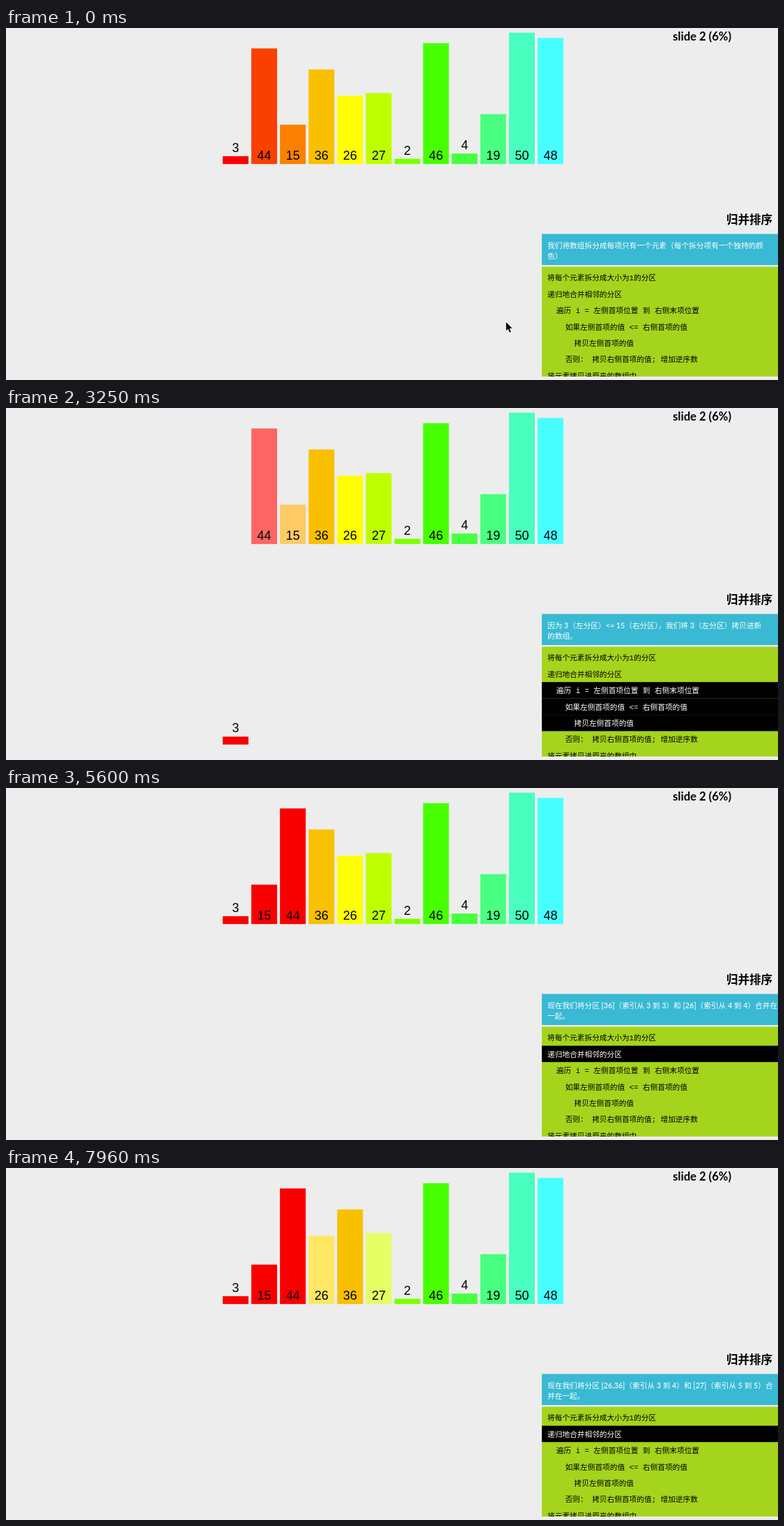
Recreate the animation shown at these times as an HTML page with a canvas. Size 1108 by 505 pixels, loop 8000 ms.

```html
<!DOCTYPE html>
<html lang="zh-CN">
<head>
<meta charset="utf-8">
<title>归并排序</title>
<style>
html, body { margin: 0; width: 100%; height: 100%; overflow: hidden; background: #ededed; }
canvas { display: block; }
</style>
</head>
<body>
<canvas id="stage" width="1108" height="505"></canvas>
<script>
const ctx = document.getElementById('stage').getContext('2d');

const LOOP = 8000, TICK = 147.4;
const FIRST = 179, PERIOD = 451.6, MOVE = 250;
const CJK = '"Noto Sans CJK SC", "Noto Sans CJK", sans-serif';
const NOTE_FONT = '500 10.7px Lato, ' + CJK;
const CODE_FONT = '500 10.7px "Liberation Mono", "Noto Sans CJK SC", "Noto Sans CJK", monospace';

const values = [3, 44, 15, 36, 26, 27, 2, 46, 4, 19, 50, 48];
const code = [
  [0, '将每个元素拆分成大小为1的分区'],
  [0, '递归地合并相邻的分区'],
  [1, '遍历 i = 左侧首项位置 到 右侧末项位置'],
  [2, '如果左侧首项的值 <= 右侧首项的值'],
  [3, '拷贝左侧首项的值'],
  [2, '否则： 拷贝右侧首项的值; 增加逆序数'],
  [0, '将元素拷贝进原来的数组中']
];

// Run the sort once and keep a snapshot of the bars after every step.
const bars = {};
values.forEach((v, i) => { bars[v] = { slot: i, low: 0, tint: i, lit: false }; });
const steps = [];
let inversions = 0;

function snap(text, rows) {
  steps.push({ text, rows, bars: values.map(v => ({ ...bars[v] })) });
}

function light(...heads) {
  heads.forEach(v => { if (v !== undefined) bars[v].lit = true; });
}

// "|" marks a line break in the note.
function announce(left, right, start, tail) {
  const mid = start + left.length, end = mid + right.length - 1;
  light(left[0], right[0]);
  snap(`现在我们将分区 [${left}]（索引从 ${start} 到 ${mid - 1}）和 [${right}]（索引从 ${mid} 到 ${end}）${tail}`, [1]);
}

function merge(left, right, start, tail) {
  announce(left, right, start, tail);
  const out = [];
  while (left.length || right.length) {
    const [a, b] = [left[0], right[0]];
    const fromLeft = b === undefined || a <= b;
    const v = fromLeft ? left.shift() : right.shift();
    const both = a !== undefined && b !== undefined;
    const side = fromLeft ? '左' : '右';
    const why = both ? `${a}（左分区）${fromLeft ? '<=' : '>'} ${b}（右分区）`
                     : `${fromLeft ? '右' : '左'}分区是空的`;
    let text = `因为${both ? ' ' : ''}${why}，我们将 ${v}（${side}分区）拷贝进新${both ? '|' : ''}的数组。`;
    if (!fromLeft) {
      text += `${both ? '' : '|'}(我们将左分区的大小 (= ${left.length}) 加至逆序数 (${inversions}).)`;
      inversions += left.length;
    }
    bars[v] = { slot: start + out.length, low: 1, tint: start, lit: false };
    out.push(v);
    light(left[0], right[0]);
    snap(text, fromLeft ? [2, 3, 4] : [2, 5]);
  }
  for (const v of out) {
    bars[v].low = 0;
    snap('我们将新数组中的元素拷贝回原来的数组中。', [6]);
  }
}

snap('我们将数组拆分成每项只有一个元素（每个拆分项有一个独特的颜|色）', []);
merge([3], [44], 0, '合并在|一起。');
merge([3, 44], [15], 0, '合并|在一起。');
merge([36], [26], 3, '合并在|一起。');
announce([26, 36], [27], 3, '合|并在一起。');

const clamp = x => Math.min(1, Math.max(0, x));
const mix = (a, b, p) => a + (b - a) * p;
const ease = x => x < 0.5 ? 4 * x ** 3 : 1 - 4 * (1 - x) ** 3;

function colorOf({ tint: i, lit }) {
  const rgb = [
    i < 4 ? 249 : Math.max(72, 255 - 66 * (i - 4)),
    Math.min(255, 64 * i),
    clamp((i - 7) / 4) * 255
  ];
  return lit ? rgb.map(c => 101 + 154 * (c / 255) ** 0.6) : rgb;
}

function box(color, x, y, w, h) {
  ctx.fillStyle = color;
  ctx.fillRect(x, y, w, h);
}

function write(text, x, y, font, color, align = 'left') {
  ctx.font = font;
  ctx.fillStyle = color;
  ctx.textAlign = align;
  ctx.fillText(text, x, y);
}

function drawBar(value, from, to, age) {
  const p = ease(clamp(age / MOVE));
  const moving = from.slot !== to.slot || from.low !== to.low;
  const fade = moving ? clamp(2 * p - 1) : clamp(age / 100);
  const a = colorOf(from), b = colorOf(to);
  const rgb = a.map((c, i) => Math.round(mix(c, b[i], fade)));
  const x = 311 + 41.09 * mix(from.slot, to.slot, p);
  const base = 195.2 + 287.6 * mix(from.low, to.low, p);
  const h = value * 3.77;
  box(`rgb(${rgb})`, x, base - h, 37, h);
  write(value, x + 18.5, base - 6 - (h < 20 ? h : 0),
    '18px "Liberation Sans", Arial, sans-serif', '#000', 'center');
}

function drawPanel({ text, rows }) {
  write('slide 2 (6%)', 957, 18.3, '700 16.6px Lato, sans-serif', '#000');
  write('归并排序', 1100, 281.2, '700 16.5px ' + CJK, '#000', 'right');

  box('#39b9d3', 769, 295.5, 339, 44.5);
  text.split('|').forEach((line, i) => write(line, 777, 315.8 + 15.6 * i, NOTE_FONT, '#fff'));

  ctx.save();
  ctx.beginPath();
  ctx.rect(769, 342.5, 339, 157.5);
  ctx.clip();
  box('#a5d41d', 769, 342, 339, 158);
  code.forEach(([indent, line], i) => {
    const top = 346.3 + 23.45 * i, on = rows.includes(i);
    if (on) box('#000', 769, top, 339, 23.45);
    write(line, 777 + 12.84 * indent, top + 15.9, CODE_FONT, on ? '#fff' : '#000');
  });
  ctx.restore();
}

function drawCursor(x, y) {
  ctx.beginPath();
  [[0, 0], [0, 12.5], [2.9, 9.8], [5, 14.8], [7, 14], [4.9, 9.1], [8.8, 9.1]]
    .forEach(([dx, dy]) => ctx.lineTo(x + dx, y + dy));
  ctx.closePath();
  ctx.lineWidth = 1.6;
  ctx.strokeStyle = '#fff';
  ctx.stroke();
  ctx.fillStyle = '#000';
  ctx.fill();
}

function draw(ms) {
  const tick = Math.floor((ms + 8) / 147.35);
  const t = tick * TICK - FIRST;
  const n = Math.floor(t / PERIOD);
  const age = t - n * PERIOD;
  const now = steps[n + 1], before = steps[Math.max(0, n)];

  box('#ededed', 0, 0, 1108, 505);
  values.forEach((v, i) => drawBar(v, before.bars[i], now.bars[i], age));
  drawPanel(now);
  if (n < 0) drawCursor(717.8, 422);
}

const start = performance.now();
function loop() {
  draw((performance.now() - start) % LOOP);
  requestAnimationFrame(loop);
}
loop();
</script>
</body>
</html>
```
